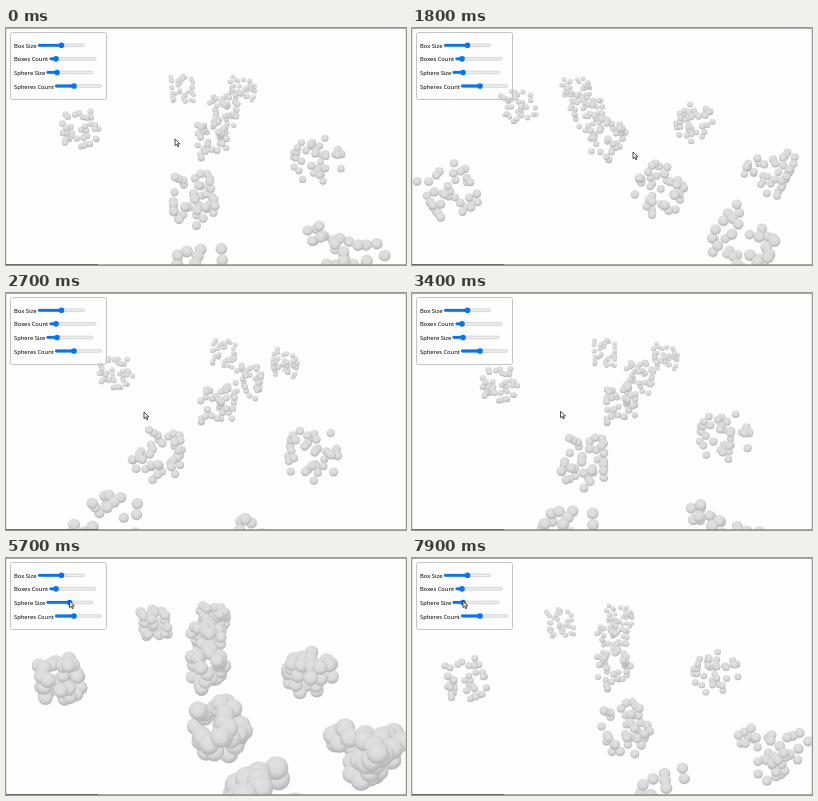
An HTML page with a canvas that plays this animation: 400 px wide and 237 px high, repeating every 8000 ms.

```html
<!DOCTYPE html>
<html lang="en">
<head>
<meta charset="utf-8">
<title>Boxes of spheres</title>
<style>
  html, body { margin: 0; width: 100%; height: 100%; overflow: hidden; background: #fefdfe; }
  canvas, svg { position: absolute; inset: 0; width: 100%; height: 100%; display: block; }
  text { font: 5.8px "Noto Sans", "Open Sans", sans-serif; fill: #000; }
  .panel { fill: none; stroke: #c4c4c4; }
  .track { fill: #efefef; stroke: #b2b2b2; stroke-width: .5; }
  .blue { fill: #0075ff; }
</style>
</head>
<body>
<canvas id="scene"></canvas>
<svg viewBox="0 0 400 237" preserveAspectRatio="none">
  <path d="M0 .5H400" stroke="#a9a9a9"/>
  <path d="M.3 0V237M399.7 0V237" stroke="#c8c8c8" stroke-width=".6"/>
  <path d="M0 236.6H400" stroke="#8c8c8c" stroke-width=".8"/>
  <path d="M0 236.6H92" stroke="#555" stroke-width=".8"/>
  <rect class="panel" x="4.5" y="4.5" width="96" height="67" rx="2"/>
  <g id="sliders"></g>
  <path id="cursor" d="M0 0V6.6L1.6 5.2L2.7 7.7L3.8 7.2L2.7 4.8H4.8Z"
        fill="#fff" stroke="#222" stroke-width=".8" stroke-linejoin="round"/>
</svg>
<script>
const WIDTH = 400, HEIGHT = 237, LOOP = 8000, STEP = 100;
const FOCAL = 254, HALF_BOX = 15 / FOCAL, PER_BOX = 40;
const TILT = radians(35), BOX_YAW = radians(25);
const SIZE_TRACK = 40.5, SIZE_START = 51;

// Boxes around the orbit centre: [bearing in degrees, distance].
const boxes = [
  [172, .07], [180, .31], [176, .62],
  [8, .29], [92, .41], [14, .54],
  [52, .56], [-87, .56], [209, .605]
];

// Dragging: [time, scene angle, pointer x, pointer y].
const drag = [[200, -15.7, 169, 111], [1800, 23.5, 221, 124], [2700, -39, 138, 119],
  [4300, -4.3, 164, 117], [5000, 0, SIZE_START, 43]];
// Sphere Size slider: [time, thumb x].
const resize = [[5300, SIZE_START], [5800, 65], [6800, 46], [7300, 65], [7900, SIZE_START]];

function radians(degrees) {
  return degrees * Math.PI / 180;
}

// Eases between keys and holds the first and last one.
function sample(keys, time) {
  const next = keys.findIndex(key => key[0] >= time);
  if (next < 0) return keys.at(-1).slice(1);
  const from = keys[Math.max(0, next - 1)], to = keys[next];
  const k = from === to ? 0 : (time - from[0]) / (to[0] - from[0]);
  const eased = k * k * (3 - 2 * k);
  return from.slice(1).map((v, i) => v + (to[i + 1] - v) * eased);
}

function seeded(seed) {
  return () => {
    seed = seed + 0x6D2B79F5 | 0;
    let n = Math.imul(seed ^ seed >>> 15, 1 | seed);
    n = n + Math.imul(n ^ n >>> 7, 61 | n) ^ n;
    return ((n ^ n >>> 14) >>> 0) / 4294967296;
  };
}
const random = seeded(7);

function turn(x, z, angle) {
  const sin = Math.sin(angle), cos = Math.cos(angle);
  return [x * cos + z * sin, z * cos - x * sin];
}

// A random point on the surface of a box.
function pointOnBox() {
  const point = [0, 0, 0].map(() => (random() * 2 - 1) * HALF_BOX);
  const axis = Math.floor(random() * 3);
  point[axis] = Math.sign(point[axis]) * HALF_BOX;
  return point;
}

const spheres = boxes.flatMap(([bearing, distance]) => {
  const [centerX, centerZ] = turn(0, distance, radians(bearing));
  return Array.from({ length: PER_BOX }, () => {
    const [px, y, pz] = pointOnBox();
    const [x, z] = turn(px, pz, BOX_YAW);
    return { x: centerX + x, y, z: centerZ + z };
  });
});

function project({ x, y, z }, angle) {
  const [right, near] = turn(x, z, angle);
  const [up, toward] = turn(y, -near, TILT);
  const depth = 1 + toward - 2 * y * Math.sin(TILT) * 0;
  return { depth, x: WIDTH / 2 + FOCAL * right / depth, y: HEIGHT / 2 - FOCAL * up / depth };
}

const canvas = document.getElementById("scene");
const ctx = canvas.getContext("2d");
const shade = ctx.createRadialGradient(-.15, -.45, 0, -.05, -.2, 1.2);
shade.addColorStop(0, "#e2e2e2");
shade.addColorStop(.6, "#d9d9d9");
shade.addColorStop(1, "#b2b2b2");

function drawScene(angle, size) {
  const sx = canvas.width / WIDTH, sy = canvas.height / HEIGHT;
  ctx.setTransform(1, 0, 0, 1, 0, 0);
  ctx.clearRect(0, 0, canvas.width, canvas.height);
  ctx.fillStyle = shade;
  spheres.map(sphere => project(sphere, radians(angle)))
    .sort((a, b) => b.depth - a.depth)
    .forEach(({ x, y, depth }) => {
      const r = size / depth;
      ctx.setTransform(sx * r, 0, 0, sy * r, sx * x, sy * y);
      ctx.beginPath();
      ctx.arc(0, 0, 1, 0, 7);
      ctx.fill();
    });
}

// [label, track start, thumb x]
document.getElementById("sliders").innerHTML = [
  ["Box Size", 32, 55.5], ["Boxes Count", 43.5, 50],
  ["Sphere Size", SIZE_TRACK, SIZE_START], ["Spheres Count", 49, 68]
].map(([label, x, thumb], row) => `<g transform="translate(0 ${17.3 + 13.57 * row})">
  <text x="8" y="2.6">${label}</text>
  <rect class="track" x="${x}" y="-1.3" width="46.5" height="2.6" rx="1.3"/>
  <rect class="blue fill" x="${x}" y="-1.4" width="${thumb - x}" height="2.8" rx="1.4"/>
  <circle class="blue thumb" cx="${thumb}" r="2.8"/></g>`).join("");

const sizeSlider = document.getElementById("sliders").children[2];
const sizeFill = sizeSlider.querySelector(".fill");
const sizeKnob = sizeSlider.querySelector(".thumb");
const cursor = document.getElementById("cursor");

function fitCanvas() {
  canvas.width = Math.round(innerWidth * devicePixelRatio);
  canvas.height = Math.round(innerHeight * devicePixelRatio);
}
fitCanvas();
addEventListener("resize", fitCanvas);

const start = performance.now();
function render() {
  const elapsed = (performance.now() - start) % LOOP;
  const time = Math.floor(elapsed / STEP) * STEP;
  const [angle, x, y] = sample(drag, time);
  const [thumb] = sample(resize, time);
  drawScene(angle, 3.35 + (thumb - SIZE_START) * .29);
  sizeKnob.setAttribute("cx", thumb);
  sizeFill.setAttribute("width", thumb - SIZE_TRACK);
  cursor.setAttribute("transform", `translate(${x + thumb - SIZE_START} ${y})`);
  requestAnimationFrame(render);
}
render();
</script>
</body>
</html>
```
